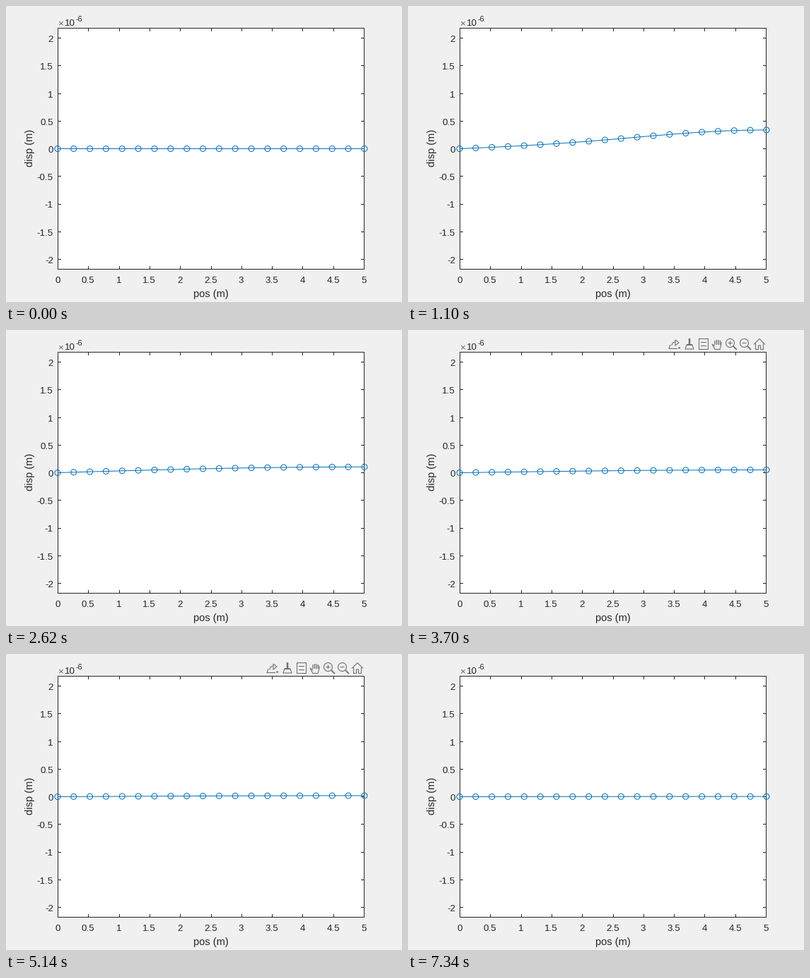
Animation, 560 px wide and 420 px high, one loop 7.36 s. Source, as a matplotlib script:

```python
import numpy as np
import matplotlib.pyplot as plt
from matplotlib.animation import FuncAnimation
from matplotlib.patches import Rectangle

W, H, DPI = 560, 420, 100
PX = 72 / DPI                      # one pixel in points
FRAMES, STEP = 368, 20
LEFT, RIGHT, TOP, BOTTOM = 73.5, 506.5, 31.5, 373.5
ZERO, UNIT = 202.5, 78.5           # UNIT: pixels per 1e-6 m
INK, BLUE, GREY = "#262626", "#0072BD", "#707070"

plt.rcParams["font.family"] = "Liberation Sans"

fig = plt.figure(figsize=(W / DPI, H / DPI), dpi=DPI, facecolor="#f0f0f0")
ax = fig.add_axes([0, 0, 1, 1])
ax.set_xlim(0, W)
ax.set_ylim(H, 0)
ax.axis("off")


def label(x, y, s, size=13.33, **kw):
    kw = {"ha": "center", "va": "baseline", "color": INK, **kw}
    return ax.text(x, y, s, fontsize=size * PX, **kw)


def stroke(x, y, color=INK, lw=1.0, **kw):
    return ax.plot(x, y, color=color, lw=lw * PX, snap=False,
                   solid_capstyle="butt", **kw)[0]


def draw_axes():
    ax.add_patch(Rectangle((LEFT, TOP), RIGHT - LEFT, BOTTOM - TOP, fc="white",
                           ec=INK, lw=PX, snap=False, zorder=1))
    for i in range(11):
        x = LEFT + (RIGHT - LEFT) * i / 10
        col = np.floor(x) + 0.5
        for y, d in ((BOTTOM, -4.5), (TOP, 4.5)):
            stroke([col, col], [y, y + d])
        label(x - 0.7, 393, f"{i / 2:g}")
    for i in range(-4, 5):
        y = ZERO - UNIT * i / 2
        row = np.floor(y) + 0.5
        for x, d in ((LEFT, 4.5), (RIGHT, -4.5)):
            stroke([x, x + d], [row, row])
        label(66.8, y + 5.5, f"{i / 2:g}", ha="right")
    label(290, 413, "pos (m)", 14.67)
    label(38, 201.5, "disp (m)", 14.67, rotation=90, rotation_mode="anchor")
    label(73.5, 28, "×", 13.33, ha="left", color="#666666")
    label(83.3, 27.5, "10", ha="left")
    label(98.8, 21.5, "-6", 10.7, ha="left")


def draw_toolbar():
    """Seven icons, 20 pixels apart, each drawn around its own centre."""
    parts = []

    def path(cx, *pts, lw=1.1, close=False):
        x, y = np.array(pts + pts[:1] * close).T
        parts.append(stroke(cx + x, 20 + y, GREY, lw, zorder=4))

    def arc(cx, r, a0=0, a1=360, dx=0, dy=0, lw=1.1):
        a = np.radians(np.linspace(a0, a1, 30))
        path(cx, *zip(dx + r * np.cos(a), dy + r * np.sin(a)), lw=lw)

    export, brush, tips, pan, zoom_in, zoom_out, home = 377 + 20 * np.arange(7)

    arc(export, 5, 180, 270, dx=1, dy=2)
    path(export, (1, -6), (6, -2), (1, 2), close=True)
    path(export, (-6, 1), (-8, 6.5), (4, 6.5))
    path(export, (5, 5.5), (8, 5.5), lw=2)

    path(brush + 1, (0, -8), (0, 0), lw=2.5)
    path(brush + 1, (-4, 1), (4, 1), lw=2)
    path(brush + 1, (-4, 1), (-6, 7), (6, 7), (4, 1))

    path(tips + 1, (-6.5, -7.5), (6.5, -7.5), (6.5, 7.5), (-6.5, 7.5),
         close=True)
    for y in (-2.5, 2.5):
        path(tips + 1, (-4, y), (4, y))

    for i in range(4):
        path(pan, (2.5 * i - 3, -6.5 + abs(i - 1.5)), (2.5 * i - 3, 1), lw=1.3)
    path(pan, (-3, 3), (-7, 0), (-3, 7.5), (4, 7.5), (6, 0), (6, -3))

    for cx in (zoom_in, zoom_out):
        arc(cx, 6, dx=-1.5, dy=-1.5)
        path(cx, (3, 3), (8, 8), lw=1.8)
        path(cx, (-4.5, -1.5), (1.5, -1.5))
    path(zoom_in, (-1.5, -4.5), (-1.5, 1.5))

    path(home, (-8, 0.5), (0, -7.5), (8, 0.5))
    path(home, (-5.5, -1), (-5.5, 7.5), (-1.5, 7.5), (-1.5, 2), (1.5, 2),
         (1.5, 7.5), (5.5, 7.5), (5.5, -1))
    return parts


NODES = np.linspace(0, 1, 20)
NODE_X = 72.9 + 434 * NODES
MODE = np.arange(60)
ODD = 2 * MODE + 1
SHAPES = np.sin(np.outer(NODES, ODD) * np.pi / 2) * (-1.0) ** MODE
AMP = 28.6


def spread(t):
    """Diffusion progress at time t (s): slow at first, then steady."""
    if t < 1.1:
        return max(0.08, 0.44 * t - 0.007) ** 2
    return 0.2275 + 0.67 * (t - 1.1)


def displacement(t):
    """Pulse at the free end, spreading towards the fixed end, in pixels."""
    p = min(t / 0.2, 1)
    load = p * p * (3 - 2 * p)
    return load * AMP * SHAPES @ np.exp(-ODD ** 2 * spread(t))


# Rings as one broken curve, so they move by less than a pixel.
ANGLE = np.append(np.linspace(0, 2 * np.pi, 33), np.nan)
RING_X, RING_Y = 4 * np.cos(ANGLE), 4 * np.sin(ANGLE)

draw_axes()
toolbar = draw_toolbar()
rod = stroke([], [], BLUE, zorder=3)
rings = stroke([], [], BLUE, zorder=3)


def update(i):
    ms = i * STEP
    y = ZERO - displacement(ms / 1000)
    rod.set_data(NODE_X, y)
    rings.set_data(np.add.outer(NODE_X, RING_X).ravel(),
                   np.add.outer(y, RING_Y).ravel())
    for part in toolbar:
        part.set_visible(2800 <= ms < 7000)
    return [rod, rings, *toolbar]


anim = FuncAnimation(fig, update, frames=FRAMES, interval=STEP,
                     repeat=True, repeat_delay=0)
plt.show()
```
